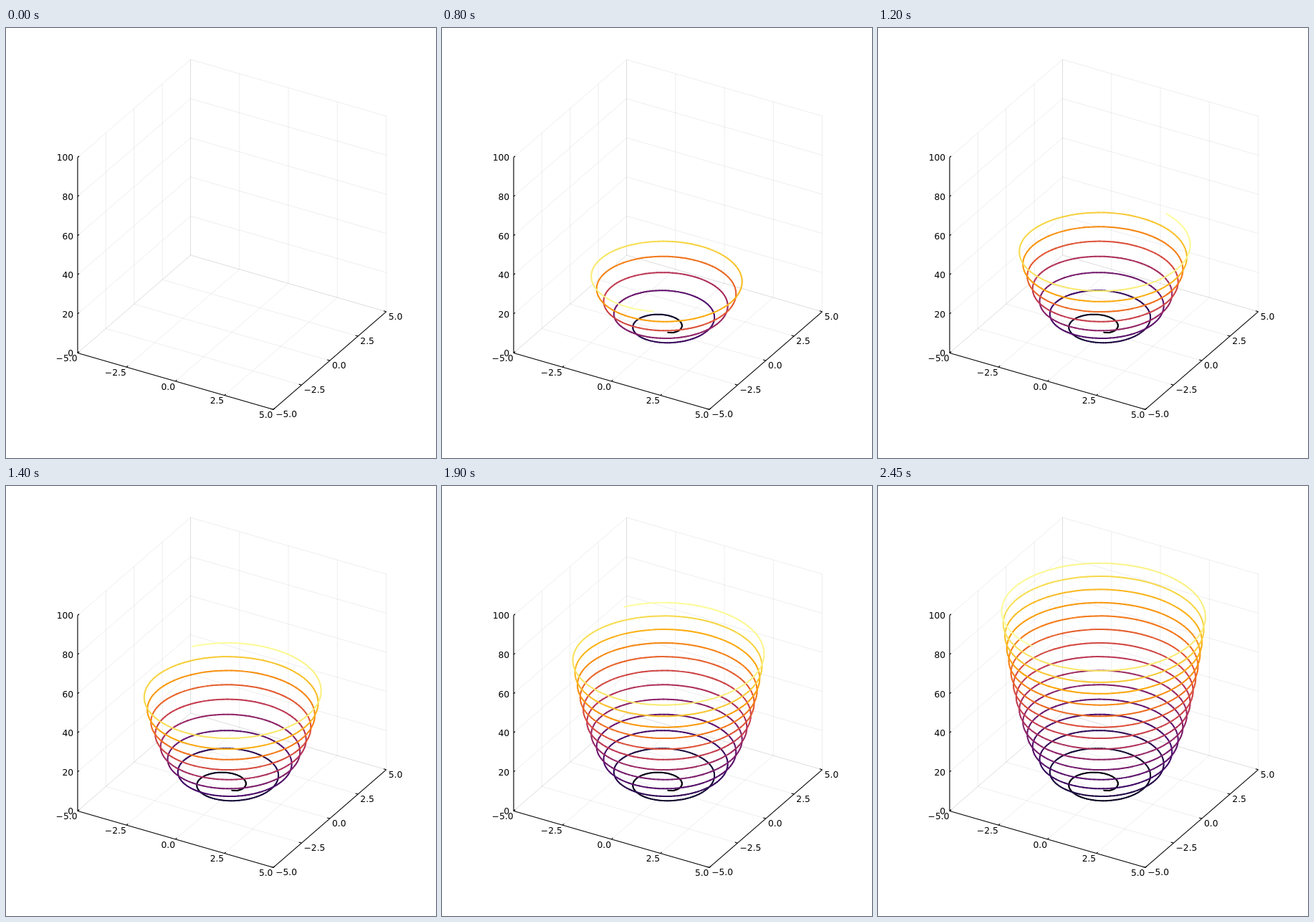
An HTML page with a canvas for the animation above (2500 ms loop, 600 px wide and 600 px high).

```html
<!DOCTYPE html>
<html lang="en">
<head>
<meta charset="utf-8">
<title>Growing spiral</title>
<style>
  html, body { margin: 0; width: 100%; height: 100%; overflow: hidden; background: #fff; }
  canvas { display: block; width: 600px; height: 600px; }
</style>
</head>
<body>
<canvas id="plot" width="600" height="600"></canvas>
<script>
const ctx = document.getElementById('plot').getContext('2d');

const LOOP = 2500, STEP = 50, PER_STEP = 30;
const DT = 30 * Math.PI / 1499;
const SCALE = 315.2, C = Math.cos(Math.PI / 6), S = 0.5;
const INFERNO = [
  [0, 0, 4], [22, 11, 57], [66, 10, 104], [106, 23, 110], [147, 38, 103], [188, 55, 84],
  [221, 81, 58], [243, 120, 25], [252, 165, 10], [246, 215, 70], [252, 255, 164]
];

// Orthographic view: azimuth 30°, elevation 30°
function project(x, y, z) {
  const u = x / 10, v = y / 10, w = z / 100;
  return [
    315.25 + SCALE * (u * C + v * S),
    424.65 + SCALE * (S * (u * S - v * C) - w * C)
  ];
}

function color(f) {
  const p = f * (INFERNO.length - 1);
  const i = Math.min(Math.floor(p), INFERNO.length - 2);
  const mix = INFERNO[i].map((c, k) => Math.round(c + (INFERNO[i + 1][k] - c) * (p - i)));
  return `rgb(${mix})`;
}

function line(a, b) {
  ctx.beginPath();
  ctx.moveTo(...a);
  ctx.lineTo(...b);
  ctx.stroke();
}

function label(text, x, y, align) {
  ctx.textAlign = align;
  ctx.fillText(text.replace('-', '\u2212'), x, y + 4.45);
}

const sides = [-5, -2.5, 0, 2.5, 5];
const heights = [0, 20, 40, 60, 80, 100];

function drawGrid() {
  ctx.lineCap = 'butt';
  ctx.lineWidth = 0.7;
  ctx.strokeStyle = 'rgba(0, 0, 0, 0.1)';
  for (const s of sides) {
    line(project(s, -5, 0), project(s, 5, 0));
    line(project(s, 5, 0), project(s, 5, 100));
    line(project(-5, s, 0), project(5, s, 0));
    line(project(-5, s, 0), project(-5, s, 100));
  }
  for (const h of heights) {
    line(project(-5, -5, h), project(-5, 5, h));
    line(project(-5, 5, h), project(5, 5, h));
  }
}

function drawAxes() {
  ctx.lineWidth = 1.1;
  ctx.strokeStyle = ctx.fillStyle = '#000';
  ctx.font = '12.3px "DejaVu Sans", sans-serif';
  const left = project(-5, -5, 0), front = project(5, -5, 0);
  line(left, front);
  line(front, project(5, 5, 0));
  line(left, project(-5, -5, 100));

  for (const s of sides) {
    const [ax, ay] = project(s, -5, 0), [bx, by] = project(5, s, 0);
    line([ax, ay], project(s, -4.87, 0));
    line([bx, by], project(4.87, s, 0));
    label(s.toFixed(1), ax - 0.5, ay + 7.4, 'right');
    label(s.toFixed(1), bx + 3.2, by + 6.3, 'left');
  }
  for (const h of heights) {
    const [x, y] = project(-5, -5, h);
    line([x, y], project(-5, -4.87, h));
    label(String(h), x - 5.8, y + 0.5, 'right');
  }
}

function spiral(i) {
  const t = i * DT, r = Math.log(1 + t);
  return project(r * Math.cos(t), r * Math.sin(t), t);
}

function drawSpiral(count) {
  ctx.lineWidth = 2;
  ctx.lineCap = 'round';
  for (let i = 0; i < count; i++) {
    ctx.strokeStyle = color(i / count);
    line(spiral(i), spiral(i + 1));
  }
}

function draw(step) {
  ctx.fillStyle = '#fff';
  ctx.fillRect(0, 0, 600, 600);
  drawGrid();
  drawAxes();
  drawSpiral(step * PER_STEP);
}

let shown = 0;
const start = performance.now();
function tick() {
  const step = Math.floor(((performance.now() - start) % LOOP) / STEP);
  if (step !== shown) draw(shown = step);
  requestAnimationFrame(tick);
}
draw(0);
requestAnimationFrame(tick);
</script>
</body>
</html>
```
